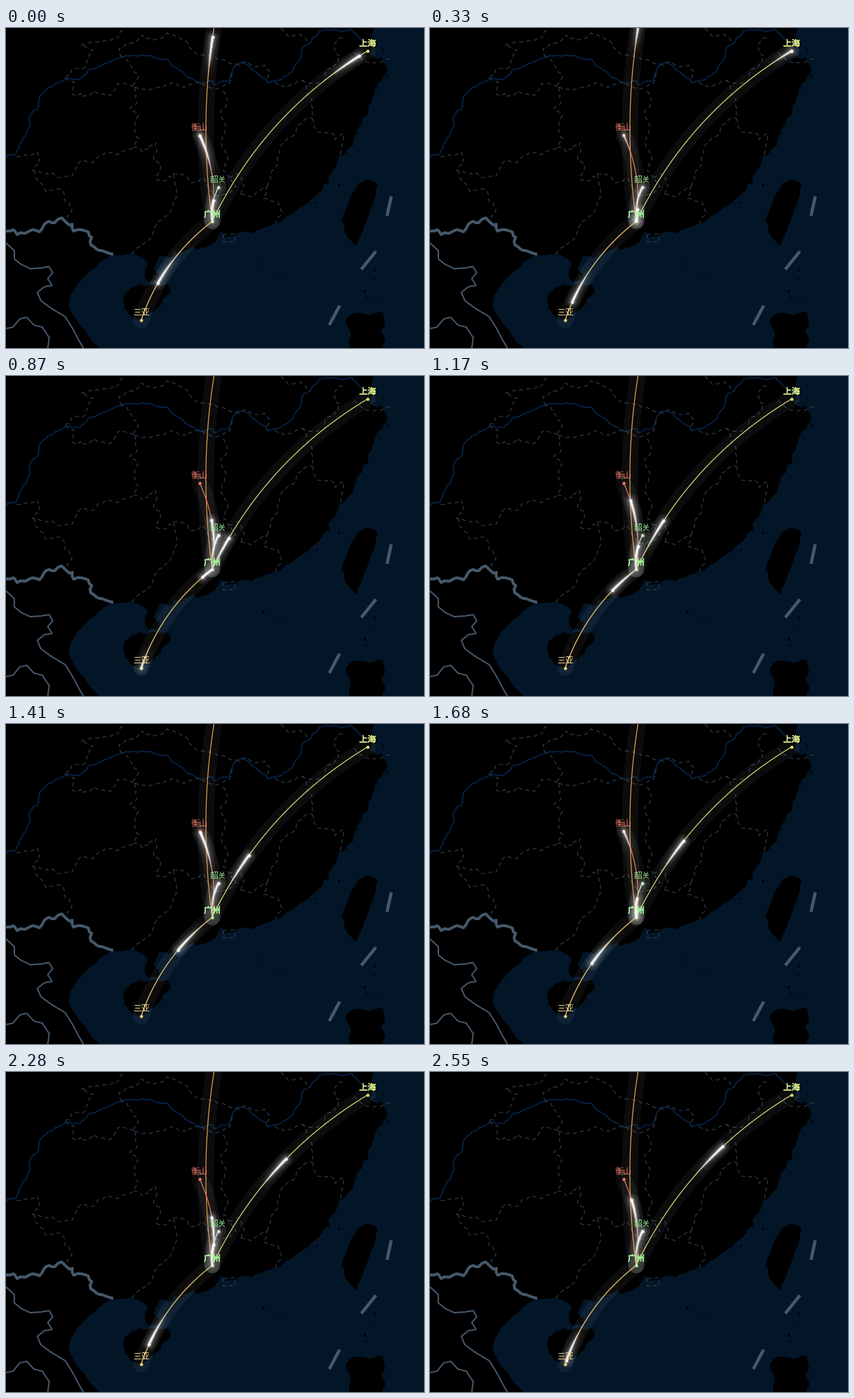
Write a matplotlib script that moves like this. It is 600 px wide and 460 px high and loops after 2.58 s.

```python
import numpy as np
import matplotlib.pyplot as plt
from matplotlib.animation import FuncAnimation
from matplotlib.collections import LineCollection
from matplotlib.patheffects import withStroke

W, H, DPI = 600, 460, 80
FRAMES, STEP = 86, 30
PX = 72 / DPI

SEA, LAND = "#031628", "#000000"
EDGE, PROVINCE, RIVER = "#46596b", "#33485a", "#05203f"

rng = np.random.default_rng(7)
plt.rcParams["font.family"] = ["Noto Sans CJK JP", "DejaVu Sans"]

fig = plt.figure(figsize=(W / DPI, H / DPI), dpi=DPI, facecolor=LAND)
ax = fig.add_axes([0, 0, 1, 1])
ax.set_xlim(0, W)
ax.set_ylim(H, 0)
ax.axis("off")


def rough(points, amp, depth=2):
    """Subdivide a polyline, shifting each new midpoint at random."""
    p = np.array(points, float)
    for _ in range(depth):
        out = np.empty((2 * len(p) - 1, 2))
        out[::2] = p
        out[1::2] = (p[1:] + p[:-1]) / 2 + rng.normal(0, amp, (len(p) - 1, 2))
        p, amp = out, amp * 0.6
    return p


def area(points, color, z):
    ax.fill(*np.transpose(points), color=color, lw=0, zorder=z)


def stroke(points, color, width, z=3, **kw):
    ax.plot(*np.transpose(points), color=color, lw=width * PX, zorder=z, **kw)


def island(*points, amp=1.2):
    area(rough(points + points[:1], amp), LAND, 2)


def province(*points):
    stroke(rough(points, 1.8), PROVINCE, 1, dashes=(6, 4.5), dash_capstyle="butt")


# Sea and coast
east = [(527, 0), (525, 14), (533, 24), (522, 38), (540, 44), (547, 58),
        (540, 74), (529, 88), (526, 105), (520, 124), (511, 140), (505, 152),
        (499, 166), (487, 180), (478, 189), (470, 205), (464, 220), (452, 235),
        (440, 245), (429, 255), (418, 262), (406, 270), (394, 280), (379, 285),
        (362, 290), (345, 293), (330, 297), (318, 300), (308, 292), (301, 306),
        (290, 314), (271, 318), (255, 322), (240, 327), (227, 328), (217, 336),
        (212, 346), (220, 354), (215, 365), (204, 365), (199, 351), (204, 339)]
gulf = [(204, 339), (195, 330), (180, 324), (166, 327), (152, 325), (140, 333),
        (130, 342), (118, 352), (104, 366), (92, 385), (90, 400), (97, 415),
        (108, 430), (120, 445), (135, 460)]
coast = np.vstack([rough(east, 2.1, 3), rough(gulf, 0.8)])
area(np.vstack([coast, [(W, H), (W, 0)]]), SEA, 1)

island((172, 381), (181, 373), (195, 369), (214, 367), (231, 368), (236, 375),
       (228, 388), (222, 398), (213, 407), (200, 417), (190, 420), (178, 413),
       (170, 405), (168, 392))
island((517, 218), (530, 221), (531, 232), (525, 255), (517, 280), (509, 299),
       (502, 314), (495, 305), (485, 292), (481, 277), (488, 258), (496, 240),
       (505, 225))
island((493, 413), (505, 409), (521, 413), (540, 408), (543, 420), (538, 435),
       (544, 446), (540, 462), (492, 462), (495, 440), (488, 425))
for x, y, r in [(370, 339, 2), (393, 352, 1.5), (530, 348, 2), (528, 361, 2),
                (515, 378, 2), (518, 388, 2), (531, 391, 1.5), (478, 226, 2),
                (547, 70, 2), (537, 90, 1.5), (541, 32, 2), (446, 251, 2)]:
    island((x - r, y), (x, y - r), (x + r, y), (x, y + r), amp=0.6)

# Rivers
stroke(rough([(0, 187), (14, 182), (18, 170), (28, 155), (35, 140), (33, 130),
              (47, 112), (48, 98), (60, 86), (70, 80), (85, 72), (105, 74),
              (118, 60), (150, 48), (166, 42), (187, 40), (210, 40), (228, 45),
              (240, 55), (258, 68), (275, 78), (290, 75), (302, 82), (320, 75),
              (330, 53), (345, 52), (360, 65), (375, 78), (386, 76), (402, 69),
              (418, 50), (425, 30), (437, 21), (450, 5), (475, 3), (496, 2),
              (506, 14), (522, 24)], 1.5), RIVER, 2)

# Province borders
province((85, 70), (93, 61), (115, 55), (125, 32), (108, 25), (130, 20),
         (150, 18), (165, 5), (168, 0))
province((166, 42), (162, 30), (178, 22), (195, 10), (205, 15), (225, 14),
         (240, 10), (260, 20), (272, 36), (300, 42), (330, 52))
province((85, 72), (98, 78), (95, 95), (110, 98), (125, 90), (150, 97),
         (160, 80), (185, 85), (190, 72), (180, 55), (166, 42))
province((185, 85), (200, 88), (220, 85), (240, 78), (260, 85), (280, 78),
         (300, 88), (320, 80), (326, 64))
province((185, 85), (188, 105), (178, 115), (190, 125), (185, 145), (190, 158),
         (183, 172))
province((15, 185), (28, 183), (45, 178), (48, 195), (38, 205), (60, 210),
         (75, 215), (95, 213), (108, 190), (125, 193), (145, 178), (160, 182),
         (183, 172))
province((40, 205), (48, 222), (60, 235), (80, 232), (85, 250), (95, 262),
         (88, 275))
province((183, 172), (195, 178), (205, 170), (215, 165), (212, 185),
         (222, 195), (215, 215), (228, 220), (240, 210), (245, 235),
         (240, 255), (225, 275), (212, 290), (205, 305), (190, 315), (180, 324))
province((240, 210), (258, 212), (270, 222), (282, 215), (298, 240),
         (318, 238), (330, 228), (320, 215))
province((312, 90), (318, 105), (308, 120), (315, 145), (308, 165), (318, 185),
         (312, 205), (320, 215))
province((320, 215), (335, 210), (342, 225), (335, 240), (355, 242),
         (375, 228), (370, 245), (390, 250), (396, 265), (388, 280))
province((375, 228), (382, 205), (390, 185), (398, 165), (412, 155),
         (418, 140), (440, 130))
province((440, 130), (448, 150), (465, 150), (472, 160), (485, 152), (480, 182))
province((386, 78), (400, 85), (425, 75), (432, 95), (440, 115), (440, 130))
province((425, 75), (442, 80), (455, 78), (460, 60), (475, 50), (480, 40),
         (470, 25), (485, 15))
province((330, 52), (345, 48), (362, 55), (378, 62), (376, 78))
province((395, 0), (405, 12), (425, 12), (437, 22))
province((500, 35), (515, 48), (530, 50), (553, 43))
stroke([(312, 297), (328, 296), (329, 307), (312, 308), (312, 297)],
       PROVINCE, 1, dashes=(6, 4))

# National borders
stroke(rough([(0, 292), (10, 290), (16, 297), (28, 295), (38, 290), (48, 293),
              (55, 282), (62, 278), (70, 280), (80, 273), (87, 280), (95, 282),
              (97, 292), (108, 290), (118, 293), (123, 301), (122, 312),
              (130, 318), (138, 320), (152, 325)], 1, 1), EDGE, 4)
stroke([(0, 309), (12, 320), (12, 332), (22, 340), (35, 346), (50, 345),
        (62, 343), (67, 352), (60, 360), (66, 370), (55, 372), (45, 380),
        (50, 392), (65, 403), (75, 409), (85, 415), (95, 431), (104, 448),
        (111, 460)], EDGE, 2)
stroke([(0, 432), (10, 430), (20, 418), (30, 416), (40, 427), (52, 430),
        (62, 445), (60, 460)], EDGE, 2)
for a, b in [((553, 242), (547, 270)), ((531, 321), (510, 347)),
             ((479, 399), (464, 427))]:
    stroke([a, b], EDGE, 4.5, solid_capstyle="butt")


class Route:
    """A bent line from the hub, with a light that travels outward."""

    hub = np.array([296, 278.0])

    def __init__(self, end, color, start, move, period):
        self.end = np.array(end, float)
        self.start, self.move, self.period = start, move, period
        dx, dy = self.end - self.hub
        bend = -0.15 * np.sign(dx)
        self.ctrl = (self.hub + self.end) / 2 + bend * np.array([-dy, dx])
        line = self.at(np.linspace(0, 1, 80))
        stroke(line, "white", 23, 4, alpha=0.05, solid_capstyle="round")
        stroke(line, color, 1.25, 5)
        ax.plot(*self.end, "o", color=color, ms=4.6 * PX, mew=0, zorder=5)

    def at(self, u):
        u = np.asarray(u)[:, None]
        return ((1 - u) ** 2 * self.hub + 2 * u * (1 - u) * self.ctrl
                + u ** 2 * self.end)

    def trail(self, now, ages):
        """Pieces of the recent path, split where the light restarts."""
        lap, phase = np.divmod(now - ages - self.start, self.period)
        pts = self.at(np.minimum(phase / self.move, 1))
        return [(ages[lap == k], pts[lap == k]) for k in np.unique(lap)]


# A minus sign on the bend keeps every line bulging away from the vertical
ROUTES = [
    Route((519, 33), "#cfdd78", 350 - 3680, 3470, 3680),
    Route((381, -260), "#e59a4c", -2740, 5700, 5900),
    Route((278, 154), "#ee7560", 156 - 1430, 1280, 1430),
    Route((305, 229), "#8fdc8f", -258, 430, 570),
    Route((194, 420), "#eccb70", 678 - 1975, 1930, 1975),
]
for r in ROUTES:
    assert np.isfinite(r.ctrl).all()
ax.plot(*Route.hub, "o", color="#a6f09a", ms=4.6 * PX, mew=0, zorder=5)


def label(x, y, text, color, weight=0):
    t = ax.text(x, y, text, color=color, size=12 * PX, ha="center",
                va="baseline", zorder=9)
    if weight:
        t.set_path_effects([withStroke(linewidth=weight * PX, foreground=color)])


label(519, 26, "上海", "#e2f08c", 0.6)
label(278, 147, "衡山", "#ee7c68")
label(305, 222, "韶关", "#8fe08f")
label(296, 272, "广州", "#a6f09a", 0.7)
label(194, 413, "三亚", "#efd996")

# Layers of the light: width in px, opacity per pass, longest age in ms
LAYERS = [(20, 0.011, 560), (13, 0.016, 520), (8, 0.022, 480),
          (3.6, 0.17, 420), (2, 0.1, 600)]
PASSES = 9
AGES = np.arange(0, 615, 15.0)

lights = []
for width, alpha, _ in LAYERS:
    lc = LineCollection([], colors="white", linewidths=width * PX, alpha=alpha,
                        capstyle="round", joinstyle="round", zorder=7)
    lights.append(ax.add_collection(lc, autolim=False))
heads, = ax.plot([], [], "o", color="white", ms=4.2 * PX, mew=0, zorder=8)


def draw(i):
    now = i * STEP
    trails = [piece for r in ROUTES for piece in r.trail(now, AGES)]
    for lc, (_, _, longest) in zip(lights, LAYERS):
        segs = []
        for limit in longest * np.arange(1, PASSES + 1) / PASSES:
            for ages, pts in trails:
                part = pts[ages <= limit]
                if len(part) > 1:
                    # the tiny step keeps a resting light visible as a dot
                    segs.append(np.vstack([part[0] + 0.05, part]))
        lc.set_segments(segs)
    tips = np.array([r.trail(now, AGES[:1])[0][1][0] for r in ROUTES])
    heads.set_data(tips[:, 0], tips[:, 1])
    return [*lights, heads]


anim = FuncAnimation(fig, draw, frames=FRAMES, interval=STEP, repeat=True,
                     repeat_delay=0, blit=False)
plt.show()
```
